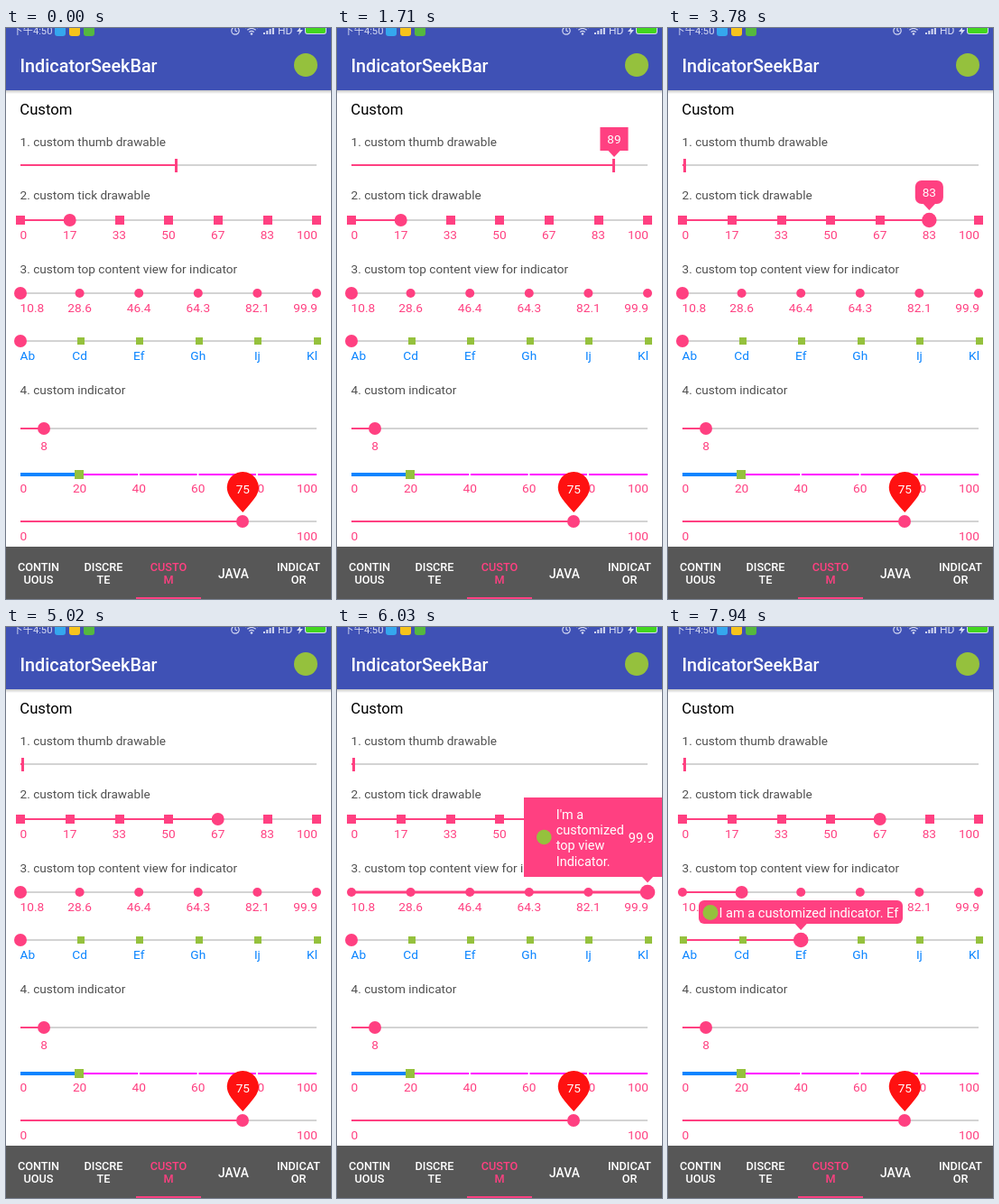
Write an HTML page with a canvas that moves like this. It is 360 px wide and 633 px high and loops after 8000 ms.

```html
<!DOCTYPE html>
<html lang="en">
<head>
<meta charset="utf-8">
<title>IndicatorSeekBar</title>
<style>
html, body { margin: 0; width: 100%; height: 100%; overflow: hidden; background: #fff; }
canvas { display: block; width: 360px; height: 633px; }
</style>
</head>
<body>
<canvas id="stage"></canvas>
<script>
const W = 360, H = 633, LOOP = 8000;
const PINK = '#ff4081', GRAY = '#d3d3d3', GREEN = '#95c13d', BLUE = '#0a84ff';
const FONT = 'Roboto, "Noto Sans CJK SC", "Noto Sans CJK", sans-serif';
const canvas = document.getElementById('stage');
const c = canvas.getContext('2d');
const dpr = window.devicePixelRatio || 1;
canvas.width = W * dpr;
canvas.height = H * dpr;

const rect = (x, y, w, h, col) => { c.fillStyle = col; c.fillRect(x, y, w, h); };

function dot(x, y, r, col) {
  c.fillStyle = col;
  c.beginPath();
  c.arc(x, y, r, 0, 7);
  c.fill();
}

function round(x, y, w, h, r, col) {
  c.fillStyle = col;
  c.beginPath();
  c.roundRect(x, y, w, h, r);
  c.fill();
}

function text(s, x, y, size, col, align = 'left', weight = 400) {
  c.font = `${weight} ${size}px ${FONT}`;
  c.textAlign = align;
  c.fillStyle = col;
  c.fillText(s, x, y);
}

function poly(col, ...p) {
  c.fillStyle = col;
  c.beginPath();
  for (let i = 0; i < p.length; i += 2) c.lineTo(p[i], p[i + 1]);
  c.fill();
}

// Track from 16 to 344 with its progress part ending at x.
function track(y, x, thick = 2) {
  rect(16, y - 1, 328, 2, GRAY);
  if (x > 16) rect(16, y - thick / 2, x - 16, thick, PINK);
}

// Tick labels: the outer two are aligned to the ends, the rest centred.
function labels(list, y, col) {
  const last = list.length - 1;
  list.forEach((s, i) => {
    const align = i === 0 ? 'left' : i === last ? 'right' : 'center';
    const x = i === 0 ? 15.5 : i === last ? 345 : 16 + 328 * i / last;
    text(s, x, y, 13.7, col, align);
  });
}

// Indicator body with an arrow below it.
function bubble(left, top, w, h, r, tipX, alpha, tip, inside) {
  c.save();
  c.globalAlpha = alpha;
  round(left, top, w, h, r, PINK);
  poly(PINK, tipX - tip, top + h - .5, tipX + tip, top + h - .5, tipX, top + h + tip);
  inside();
  c.restore();
}

// Stepped progress 0..1 over n evenly spaced changes from a to b.
const steps = (t, a, b, n) =>
  Math.max(0, Math.min(1, Math.floor((t - a) / (b - a) * (n - 1) + 1e-6) / (n - 1)));

const mix = (a, b, k) => a + (b - a) * k;

// Value of the last [time, value] pair that has begun.
function held(t, list) {
  let v = list[0][1];
  for (const [at, val] of list) if (t >= at) v = val;
  return v;
}

// Fade in from a to b and out from d to e, in n visible steps each.
function fade(t, a, b, d, e, n = 3) {
  if (t < a || t >= e) return 0;
  if (t < b) return (1 + Math.floor((t - a) / (b - a) * (n - 1))) / n;
  if (t >= d) return 1 - (1 + Math.floor((t - d) / (e - d) * (n - 1))) / n;
  return 1;
}

function statusBar() {
  rect(0, 0, W, 69, '#3f51b5');
  const g = c.createLinearGradient(0, 69, 0, 73);
  g.addColorStop(0, 'rgba(0,0,0,.22)');
  g.addColorStop(1, 'rgba(0,0,0,0)');
  rect(0, 69, W, 4, g);
  const pale = '#d5daf2';
  text('下午4:50', 7.5, 7, 11.2, pale);
  round(54, -3, 12, 12, 3, '#35a7ee');
  round(70, -3, 12, 12, 3, '#f6c31c');
  round(86, -3, 12, 12, 3, '#55b83f');
  c.strokeStyle = pale;
  c.lineWidth = 1.2;
  c.beginPath();
  c.arc(254, 3, 4.2, 0, 7);
  c.moveTo(254, 0);
  c.lineTo(254, 3);
  c.lineTo(256, 4);
  c.stroke();
  // wireless fan
  for (const r of [4, 7, 10]) {
    c.beginPath();
    c.arc(272, 7.5, r, -2.3, -.84);
    c.stroke();
  }
  dot(272, 6.5, 1.3, pale);
  for (let i = 0; i < 4; i++) rect(285 + i * 3.3, 5 - i * 2, 2, 2 + i * 2, pale);
  text('HD', 301, 7, 12, pale);
  poly(pale, 326, -1, 322, 4, 325, 4, 324, 8, 329, 2, 326, 2);
  round(331, -4, 24, 11, 3, pale);
  round(332, -3, 22, 9, 2, '#42d61f');
  text('IndicatorSeekBar', 15.5, 49, 19.8, '#fff', 'left', 500);
  dot(332, 41, 13, GREEN);
}

function tabs() {
  rect(0, 575, W, 58, '#575757');
  const names = [['CONTIN', 'UOUS'], ['DISCRE', 'TE'], ['CUSTO', 'M'], ['JAVA'], ['INDICAT', 'OR']];
  names.forEach((lines, i) => {
    const x = 36 + 72 * i, col = i === 2 ? PINK : '#fff';
    if (lines.length === 1) text(lines[0], x, 610, 13.8, col, 'center', 500);
    else lines.forEach((s, j) => text(s, x, 602 + 14 * j, 12.7, col, 'center', 500));
  });
  rect(144, 631, 72, 2, PINK);
}

function lowerBars() {
  track(444, 42);
  dot(42, 444, 7, PINK);
  text('8', 42, 468, 13.7, PINK, 'center');

  rect(16, 493, 65, 4, BLUE);
  rect(81, 494, 263, 2, '#f0f');
  for (const x of [147, 212.5, 278]) rect(x - 1, 493, 2, 4, '#fff');
  rect(76, 490, 10, 10, GREEN);
  labels(['0', '20', '40', '60', '80', '100'], 515, PINK);

  track(547, 262);
  dot(262, 547, 7, PINK);
  labels(['0', '100'], 568, PINK);
  c.fillStyle = '#ff1111';
  c.beginPath();
  c.arc(262.3, 509.5, 17.5, 2.6, .54);
  c.quadraticCurveTo(273, 525, 262.3, 537);
  c.quadraticCurveTo(251, 525, 247.3, 518.5);
  c.fill();
  text('75', 262.3, 516, 13.6, '#fff', 'center');
}

function thumbX(t) {
  if (t < 460) return 188.5;
  if (t < 960) return 198.5;
  if (t < 1800) {
    const k = steps(t, 960, 1710, 9);
    return k < 1 ? mix(200, 310, k / .875) : 306.5;
  }
  if (t < 2620) return mix(300, 22, steps(t, 1800, 2470, 8));
  return 18.5;
}

function valueBubble(x, top, r, value, alpha) {
  const w = 15.5 + 7.8 * String(value).length;
  const left = Math.min(x - w / 2, 357 - w);
  bubble(left, top, w, 26, r, x, alpha, 7,
    () => text(value, left + w / 2, top + 18, 13.6, '#fff', 'center'));
}

function bar1(t) {
  const x = thumbX(t);
  track(152, x);
  rect(x - 1.5, 145, 3, 15, PINK);
  const alpha = fade(t, 960, 1100, 2685, 2750);
  if (!alpha) return null;
  const value = x < 19 ? 0 : Math.round((x - 16) / 3.28);
  return () => valueBubble(x + .5, 110, 0, value, alpha);
}

function bar2(t) {
  const tick = i => 16.5 + 54.67 * i;
  const at = held(t, [[0, 1], [2940, 2], [3410, 3], [3590, 4], [3765, 5], [4170, 6], [4560, 5], [4745, 4]]);
  const x = tick(at) - .5;
  track(213, x);
  for (let i = 0; i < 7; i++) rect(Math.round(tick(i) - 5.2), 208, 10, 10, PINK);
  dot(x, 213, t >= 2940 && t < 5020 ? 8.2 : 7, PINK);
  const names = ['0', '17', '33', '50', '67', '83', '100'];
  labels(names, 234, PINK);
  const alpha = fade(t, 2940, 3220, 4840, 5020);
  if (!alpha) return null;
  // The indicator trails the thumb on its way to the right end.
  const shown = t >= 4170 && t < 4370 ? 5 : at;
  return () => valueBubble(tick(shown) - .5, 169, 7, names[shown], alpha);
}

const tick6 = i => 16 + 65.6 * i;

function bar3(t) {
  const at = held(t, [[0, 0], [5340, 3], [5765, 4], [6030, 5], [6520, 4], [6720, 3], [6815, 2], [6910, 1]]);
  const x = tick6(at), pressed = t >= 5340 && t < 7560;
  track(294, x, pressed ? 3 : 2);
  for (let i = 0; i < 6; i++) dot(tick6(i), 294, 5, PINK);
  dot(x, 294, pressed ? 8.3 : 7, PINK);
  const names = ['10.8', '28.6', '46.4', '64.3', '82.1', '99.9'];
  labels(names, 315, PINK);
  const alpha = fade(t, 5340, 5590, 7440, 7560);
  if (!alpha) return null;
  const value = at === 1 && t < 7250 ? names[2] : names[at];
  const left = Math.min(x - 76.5, 207);
  return () => bubble(left, 189, 153, 88, 0, x, alpha, 6.5, () => {
    dot(left + 22.3, 233, 8.3, GREEN);
    ["I'm a", 'customized', 'top view', 'Indicator.'].forEach(
      (s, i) => text(s, left + 35.7, 213 + 17.2 * i, 14.5, '#fff'));
    text(value, left + 115.7, 238.7, 14.6, '#fff');
  });
}

function bar4(t) {
  const on = t >= 7750, x = tick6(on ? 2 : 0);
  track(347, x);
  for (let i = 0; i < 6; i++) rect(Math.round(tick6(i) - 3), 343, 8, 8, GREEN);
  dot(x, 347, on ? 8.3 : 7, PINK);
  labels(['Ab', 'Cd', 'Ef', 'Gh', 'Ij', 'Kl'], 368, BLUE);
  const alpha = fade(t, 7750, 7940, LOOP, LOOP);
  if (!alpha) return null;
  return () => bubble(34, 303, 226, 26, 6, x, alpha, 7, () => {
    dot(47, 316.5, 8.5, GREEN);
    text('I am a customized indicator. Ef', 56.5, 322, 14.55, '#fff');
  });
}

function draw(t) {
  c.setTransform(dpr, 0, 0, dpr, 0, 0);
  rect(0, 0, W, H, '#fff');
  text('Custom', 15.3, 96, 16.7, '#000');
  const heads = [['1. custom thumb drawable', 131], ['2. custom tick drawable', 190],
    ['3. custom top content view for indicator', 272], ['4. custom indicator', 406]];
  for (const [s, y] of heads) text(s, 15.5, y, 13.63, '#505050');
  const popups = [bar1(t), bar2(t), bar3(t), bar4(t)];
  lowerBars();
  for (const show of popups) if (show) show();
  statusBar();
  tabs();
}

const start = performance.now();
function loop() {
  draw((performance.now() - start) % LOOP);
  requestAnimationFrame(loop);
}
loop();
</script>
</body>
</html>
```
